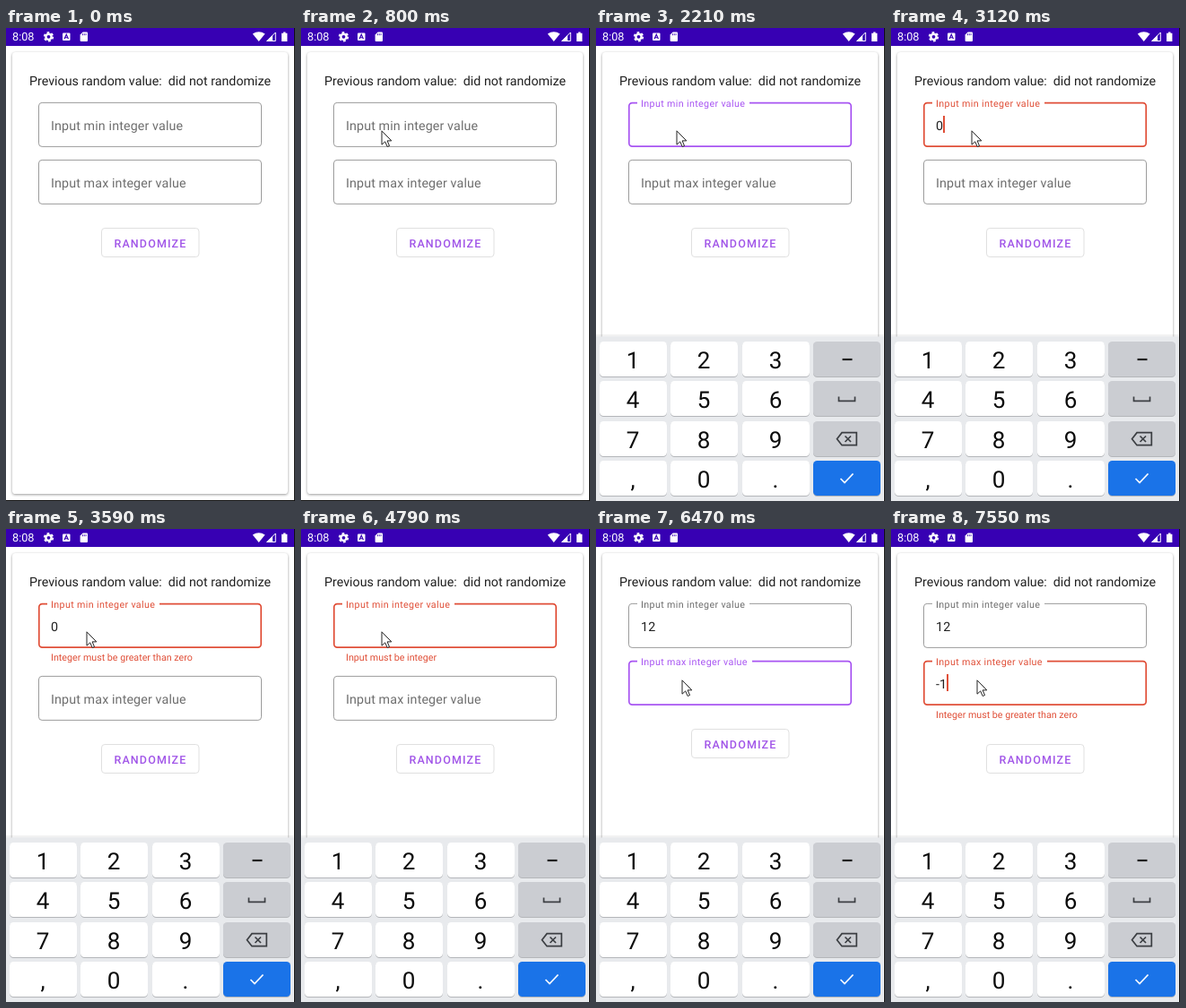
These frames come from a looping animation (322x528 px, 8 s). An HTML page:

```html
<!DOCTYPE html>
<html lang="en">
<head>
<meta charset="utf-8">
<title>Randomizer form</title>
<style>
html, body { margin: 0; width: 100%; height: 100%; overflow: hidden; background: #fff; }
svg { display: block; }
text { font-family: Roboto, Arial, sans-serif; white-space: pre; text-rendering: geometricPrecision; }
.entry { font-size: 14.27px; letter-spacing: .0094em; fill: #202020; }
.error { font-size: 10.7px; fill: #e04f38; }
.card { filter: drop-shadow(0 1px 1.7px rgba(0, 0, 0, .4)); }
.button { font-size: 12.5px; font-weight: 500; letter-spacing: .0893em; fill: #a155e8; }
.digit { font-size: 26px; text-anchor: middle; fill: #0c0c0c; }
</style>
</head>
<body>
<svg id="stage" width="322" height="528" viewBox="0 0 322 528">
  <rect width="322" height="528" fill="#fff"/>
  <rect class="card" x="7" y="27" width="307" height="493" rx="3.6" fill="#fff"/>
  <text x="160.5" y="64" font-size="14.27" text-anchor="middle" fill="#202020">Previous random value:&#160; did not randomize</text>
  <g id="fields"></g>
  <g id="button">
    <rect x="106.5" y="223.5" width="108.5" height="32" rx="3.6" fill="#fff" stroke="#e0e0e0"/>
    <text class="button" x="120.5" y="244.8">RANDOMIZE</text>
  </g>
  <rect y="527" width="322" height="1" fill="#111"/>
  <g id="keyboard"></g>
  <rect width="322" height="20" fill="#3700b3"/>
  <text x="7" y="14.4" font-size="12.7" fill="#fff">8:08</text>
  <g fill="#fff">
    <circle cx="47.5" cy="9.8" r="3.1" fill="none" stroke="#fff" stroke-width="2.4"/>
    <circle cx="47.5" cy="9.8" r="4.8" fill="none" stroke="#fff" stroke-width="1.8" stroke-dasharray="2.7 2.327"/>
    <rect x="63" y="5.5" width="8.5" height="8.5" rx="1"/>
    <path d="M65 12.2 67.25 7.2 69.5 12.2M65.8 10.7H68.7" fill="none" stroke="#3700b3" stroke-width="1.1"/>
    <path d="M85.6 4.6H90a1 1 0 0 1 1 1V14a1 1 0 0 1-1 1H83.6a1 1 0 0 1-1-1V7.6Z"/>
    <path d="M85.5 6.2V8.2M87.3 6.2V8.2M89.1 6.2V8.2" stroke="#3700b3" stroke-width=".8"/>
    <path d="M281.7 15 274.8 6.6Q281.7 1.8 288.6 6.6Z"/>
    <path d="M300.3 5V14.5H290.8Z" fill="none" stroke="#fff"/>
    <path d="M297 8V15H290Z"/>
    <path d="M309 4.5H311.5V5.7H313.4V15H307V5.7H309Z"/>
  </g>
  <rect x="321" width="1" height="528" fill="#111"/>
  <circle id="ring" r="11.2" fill="none" stroke="#444"/>
  <path id="mouse" d="M1 .8V16.2L4.7 12.9 7.2 18.5 9.5 17.5 7.1 11.9H11.8Z" fill="#fff" stroke="#222" stroke-linejoin="round"/>
</svg>
<script>
const LOOP = 8000;
const PURPLE = '#a855f2', RED = '#e04f38', GREY = '#9c9c9c', HINT = '#6e6e6e';
const $ = id => document.getElementById(id);

// Latest value of a [time, value] table
const at = (t, rows) => {
  let value = rows[0][1];
  for (const [time, next] of rows) if (t >= time) value = next;
  return value;
};
const set = (el, attrs) => { for (const k in attrs) el.setAttribute(k, attrs[k]); };
const write = (el, text) => { if (el.textContent !== text) el.textContent = text; };

function makeField(label, gap) {
  const g = document.createElementNS('http://www.w3.org/2000/svg', 'g');
  g.innerHTML = `<rect rx="3.6" fill="none"/>
    <rect x="46" y="80" width="${gap}" height="7" fill="#fff"/>
    <text x="50">${label}</text>
    <text class="entry" x="50" y="113.5"></text>
    <rect y="98" width="2" height="19"/>
    <text class="error" x="50" y="147"></text>`;
  $('fields').append(g);
  const [box, notch, hint, entry, caret, error] = g.children;
  return { g, box, notch, hint, entry, caret, error };
}

function drawField(f, s) {
  const color = s.bad ? RED : s.active ? PURPLE : s.hover ? '#777' : GREY;
  set(f.g, { transform: `translate(0 ${s.y})` });
  set(f.box, s.active
    ? { x: 36.8, y: 83.6, width: 247.4, height: 48.6, stroke: color, 'stroke-width': 1.7 }
    : { x: 36.5, y: 83.4, width: 248, height: 49, stroke: color, 'stroke-width': 1 });
  set(f.notch, { opacity: s.lift ? 1 : 0 });
  set(f.hint, {
    y: 113.5 - 26 * s.lift,
    'font-size': 14.27 - 3.57 * s.lift,
    'letter-spacing': .13 + .226 * s.lift,
    fill: s.active ? color : HINT
  });
  write(f.entry, s.text);
  const width = [...s.text].reduce((sum, c) => sum + (c === '-' ? 4.05 : 8.13), 0);
  set(f.caret, { x: 50 + Math.round(width), opacity: s.caret, fill: s.bad ? RED : PURPLE });
  write(f.error, s.error);
  set(f.error, { opacity: s.fade });
}

function buildKeyboard() {
  let out = `<rect y="342" width="321" height="4" fill="#000" opacity=".05"/>
    <rect y="344.5" width="321" height="184" fill="#e8eaed"/>`;
  ['123-', '456_', '789<', ',0.>'].forEach((row, r) => [...row].forEach((c, i) => {
    const x = Math.round(4 + i * 79.4), y = Math.round(349.8 + r * 44.4);
    const fill = i < 3 ? '#fff' : r < 3 ? '#cbcdd2' : '#1a73e8';
    out += `<rect x="${x}" y="${y + 1}" width="75" height="39" rx="4.5" fill="#b4b6ba"/>
      <rect x="${x}" y="${y}" width="75" height="39" rx="4.5" fill="${fill}"/>`;
    if (i < 3) out += `<text class="digit" x="${x + 37}" y="${y + 29.7}">${c}</text>`;
  }));
  out += `<g fill="none" stroke="#3c3f43" stroke-width="1.7">
    <path d="M274.5 370H285.5" stroke="#222" stroke-width="2.2"/>
    <path d="M270.5 411.5V416.3H288.5V411.5"/>
    <path d="M274 451.7H290.3V465.7H274L268.5 458.7Z"/>
    <path d="M277.5 455.5 284 462M284 455.5 277.5 462"/>
    <path d="M272.5 503 277 507.5 286.5 497.5" stroke="#fff"/></g>`;
  $('keyboard').innerHTML = out;
}

const TICK = 67;
const approach = [[157, 488], [150, 424], [139, 345], [123, 268], [105, 207], [89, 166],
  [77, 141], [71, 127], [76, 119], [84, 115], [89, 114]].map((p, i) => [130 + i * TICK, p]);
const descend = [[90, 124], [91, 137], [92, 149], [94, 161], [95, 168]]
  .map((p, i) => [5317 + i * 66, p]);
const mousePath = [[0, null], ...approach, ...descend];

const RANGE = 'Integer must be greater than zero', FORMAT = 'Input must be integer';
const min = makeField('Input min integer value', 125);
const max = makeField('Input max integer value', 128);
buildKeyboard();

function render(t) {
  const minBad = t >= 3120 && t < 4990;
  const maxBad = t >= 7010;
  const minShift = at(t, [[0, 0], [3185, 17], [5055, 0]]);
  const maxShift = at(t, [[0, 0], [7080, 17]]);

  drawField(min, {
    y: 0,
    active: t >= 1530 && t < 6200,
    bad: minBad,
    lift: at(t, [[0, 0], [1530, .55], [1610, 1]]),
    text: at(t, [[0, ''], [3120, '0'], [4120, ''], [4990, '1'], [5190, '12']]),
    caret: at(t, [[0, 0], [1330, 1], [1860, 0], [2330, 1], [2930, 0], [3120, 1],
      [3590, 0], [4120, 1], [4790, 0], [4990, 1], [5720, 0]]),
    error: t < 4120 ? RANGE : FORMAT,
    fade: at(t, [[0, 0], [3185, .3], [3250, .7], [3320, 1], [4120, .5], [4250, 1], [4990, 0]])
  });
  drawField(max, {
    y: 64 + minShift,
    active: t >= 6200,
    bad: maxBad,
    hover: t >= 5860,
    lift: at(t, [[0, 0], [6200, .55], [6280, 1]]),
    text: at(t, [[0, ''], [7010, '-'], [7550, '-1']]),
    caret: at(t, [[0, 0], [6000, 1], [6470, 0], [7010, 1]]),
    error: t < 7550 ? FORMAT : RANGE,
    fade: at(t, [[0, 0], [7080, .2], [7150, .5], [7220, .8], [7350, 1]])
  });
  set($('button'), { transform: `translate(0 ${minShift + maxShift})` });
  set($('keyboard'), { transform: `translate(0 ${at(t, [[0, 190], [2130, 80], [2210, 0]])})` });

  const spot = at(t, mousePath);
  set($('mouse'), { opacity: spot ? 1 : 0 });
  const click = (t >= 867 && t < 1010) || (t >= 5860 && t < 6000);
  set($('ring'), { opacity: click ? 1 : 0 });
  if (spot) {
    set($('mouse'), { transform: `translate(${spot})` });
    set($('ring'), { cx: spot[0], cy: spot[1] });
  }
}

const start = performance.now();
function frame() {
  render((performance.now() - start) % LOOP);
  requestAnimationFrame(frame);
}
frame();
</script>
</body>
</html>
```
